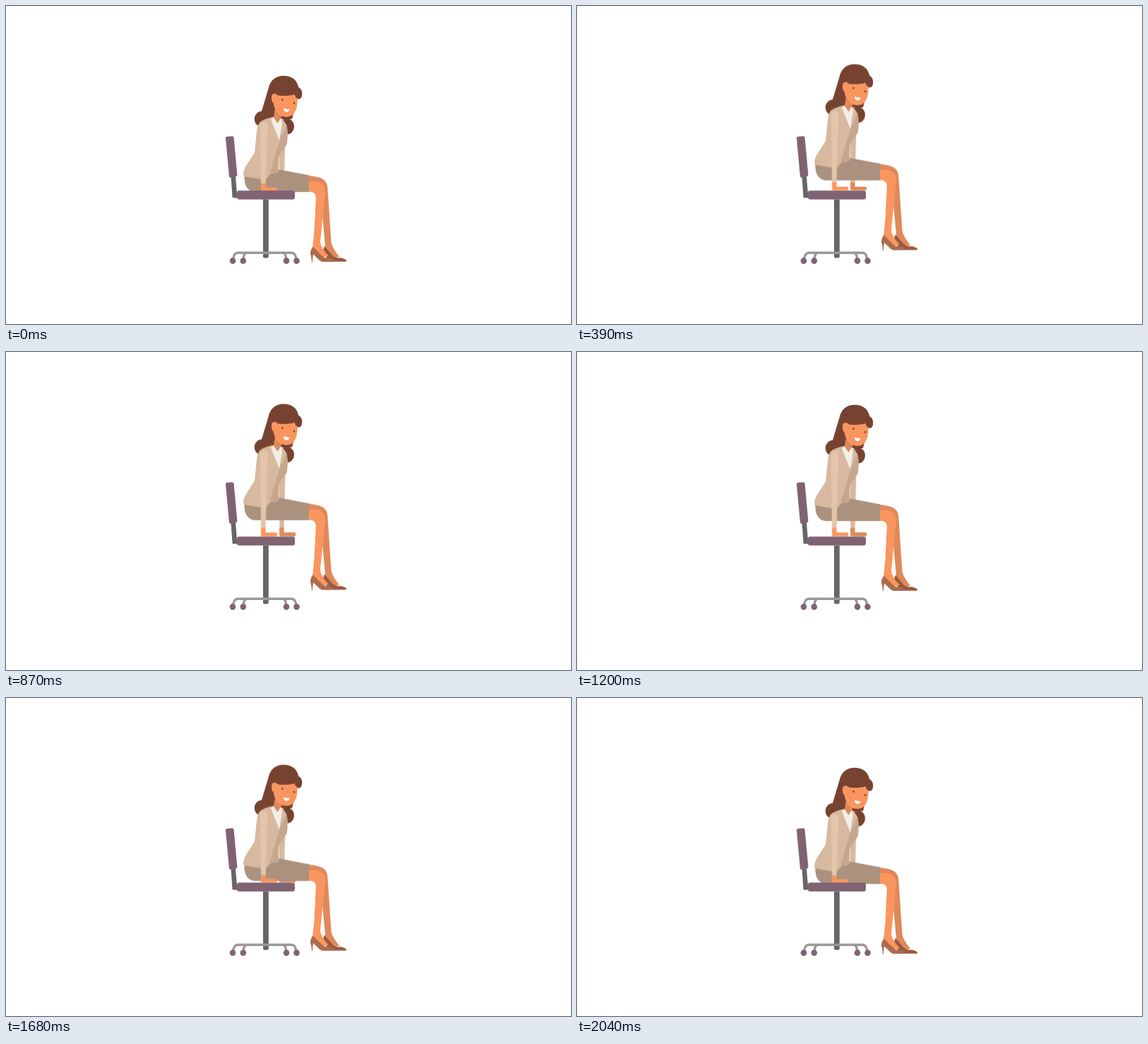
An HTML page for the animation above (2100 ms loop, 800 px wide and 450 px high).

```html
<!DOCTYPE html>
<html lang="en">
<head>
<meta charset="utf-8">
<title>Chair push-up</title>
<style>
  html, body { margin: 0; width: 100%; height: 100%; overflow: hidden; background: #fff; }
  svg { display: block; width: 100%; height: 100%; }

  :root {
    --skin: #f99660; --skin-dark: #df895a;
    --hair: #774330;
    --jacket: #d7b9a0; --jacket-dark: #c5a78e; --sleeve: #e4c5aa;
    --skirt: #ab927f; --shirt: #f3eee7;
    --shoe: #ab6c4d; --shoe-dark: #99593f;
    --plum: #806373; --steel: #666; --chrome: #999;
  }

  .body { animation: lift 2100ms infinite; }
  .arm { transform-origin: 0 261px; animation: reach 2100ms infinite; }

  /* Arms stretch from the seat, so the shoulders follow the body. */
  @keyframes lift {
    0% { transform: translateY(0); animation-timing-function: ease; }
    50%, 53.33% { transform: translateY(-25.7px); animation-timing-function: cubic-bezier(.25, .1, .35, 1); }
    100% { transform: translateY(0); }
  }
  @keyframes reach {
    0% { transform: scaleY(1); animation-timing-function: ease; }
    50%, 53.33% { transform: scaleY(1.265); animation-timing-function: cubic-bezier(.25, .1, .35, 1); }
    100% { transform: scaleY(1); }
  }
</style>
</head>
<body>
<svg viewBox="0 0 800 450">
  <defs>
    <path id="hand" d="M0 251.2H6.5V256.4H21Q23.3 256.6 23.3 258.7T21 261H2Q0 261 0 259Z" fill="var(--skin)"/>
  </defs>

  <!-- chair back -->
  <path d="M318.5 241H325L327.5 271.5H322Q320.7 271.5 320.5 270Z" fill="var(--steel)"/>
  <path d="M313.5 184.8 320 184.2Q322.3 184 322.6 186.5L327.4 238.500Q327.500 241 325 241.500L318.500 243Q316.200 243.200 315.900 240.500L311 187.500Q310.900 185 313.500 184.800Z" fill="var(--plum)"/>

  <!-- far arm -->
  <g class="arm">
    <path d="M385 175H396L393.5 252H387.5Z" fill="var(--jacket)"/>
    <use href="#hand" x="387" style="--skin: var(--skin-dark)"/>
  </g>

  <g class="body">
    <!-- far leg -->
    <path d="M427 239.500 441 242Q454.500 245 455.300 257L460.500 334Q461 341 472 355L462 357 449 341 452 340 448.300 300 444 262 427 255Z" fill="var(--skin-dark)"/>
    <path d="M451.500 340.500Q447.500 345.500 449 349L458 361.800H479Q482.500 361.800 482 359.800 480.500 357.800 473.500 356.300 468 357.500 463 354Z" fill="var(--shoe-dark)"/>
    <!-- near leg -->
    <path d="M427 248H438Q452 249.500 452 263L445 333Q444.500 341 457 354L448 356 434 342 436.500 318 438.800 271Q438.500 264 432 263H427Z" fill="var(--skin)"/>
    <path d="M434.500 340.500Q430.500 346 431 351 432.500 354 432.900 362.500H433.900Q434.200 355 435.300 351.500L444 360Q446 362 449 362H462Q465.500 362 465 360 463 357.300 457 356.300 451 357.500 447 353Z" fill="var(--shoe)"/>

    <!-- skirt -->
    <path d="M337.500 240 370 234 387 231.500 429 239.500V263.300H352Q336.500 261 337.500 240Z" fill="var(--skirt)"/>

    <!-- hair behind the face -->
    <path d="M371.500 117Q375.500 99 393 98.800 410 99 414 114L413 128 405 160H374L361 152Z" fill="var(--hair)"/>
    <circle cx="363" cy="160" r="11.200" fill="var(--hair)"/>
    <ellipse cx="397.500" cy="170.500" rx="10.500" ry="11.300" fill="var(--hair)"/>

    <!-- jacket and collar -->
    <path d="M378 157Q363 160.500 359 165 355.500 170 354.800 180L352 207.500 340 226Q335 235 336.500 241L367 246.300 375 237.500 385.500 235.500V214L397.500 196Q400.500 174 396 166.500 393 161 389 158.500L386 167Z" fill="var(--jacket)"/>
    <path d="M387 191 397.300 168Q399.500 182 397.800 195L385.700 213.500V235.500Q380 239 373.500 236.500Z" fill="var(--jacket-dark)"/>
    <path d="M375 160.500 379 157 390 159.500 391 165 387 190.500Z" fill="var(--shirt)"/>
    <path d="M380.500 147 391 155 389 158.500 384.500 166 379 157.500Z" fill="var(--skin-dark)"/>

    <!-- face -->
    <path d="M378 124H413L412.500 138Q410.500 156.500 397 157 381 156 378.500 137 375.700 136 376 129 376.200 125 378 124Z" fill="var(--skin)"/>
    <path d="M376.500 126Q377 112 392 108 409 107 415 115.500 419.500 118 419.200 125 419 130.500 415 132 410 131 408.500 125Q402 127.500 388 127 384 126.500 382.500 124.500 379 123 376.500 126Z" fill="var(--hair)"/>
    <ellipse cx="391.500" cy="132.500" rx="1.200" ry="1.500" fill="var(--hair)"/>
    <ellipse cx="408" cy="137.300" rx="1.200" ry="1.500" fill="var(--hair)"/>
    <path d="M393 144.500Q397 146.300 401.500 146 400.500 150.300 396.800 150 393 149 393 144.500Z" fill="#fff"/>
  </g>

  <!-- near arm -->
  <g class="arm">
    <path d="M359.700 170Q360 164.500 365 164.500T370.500 170L367.500 251.400H361Z" fill="var(--sleeve)"/>
    <use href="#hand" x="361"/>
  </g>

  <!-- seat and base -->
  <rect x="327" y="261.300" width="82" height="12.400" rx="3" fill="var(--plum)"/>
  <path d="M364 273.700H371.800V354.500Q371.800 356.500 369.800 356.500H366Q364 356.500 364 354.500Z" fill="var(--steel)"/>
  <g fill="none" stroke="var(--chrome)" stroke-width="3.400">
    <path d="M321.500 358Q323 349.200 328 349.200H404.500Q409.500 349.200 411 358"/>
    <path d="M336.200 358Q336.500 350.500 341 349.200M396.600 358Q396.500 350.500 392 349.200"/>
  </g>
  <g fill="var(--plum)">
    <circle cx="321" cy="360.600" r="4.300"/>
    <circle cx="335.800" cy="360.600" r="4.300"/>
    <circle cx="397" cy="360.600" r="4.300"/>
    <circle cx="411.500" cy="360.600" r="4.300"/>
  </g>
</svg>
</body>
</html>
```
